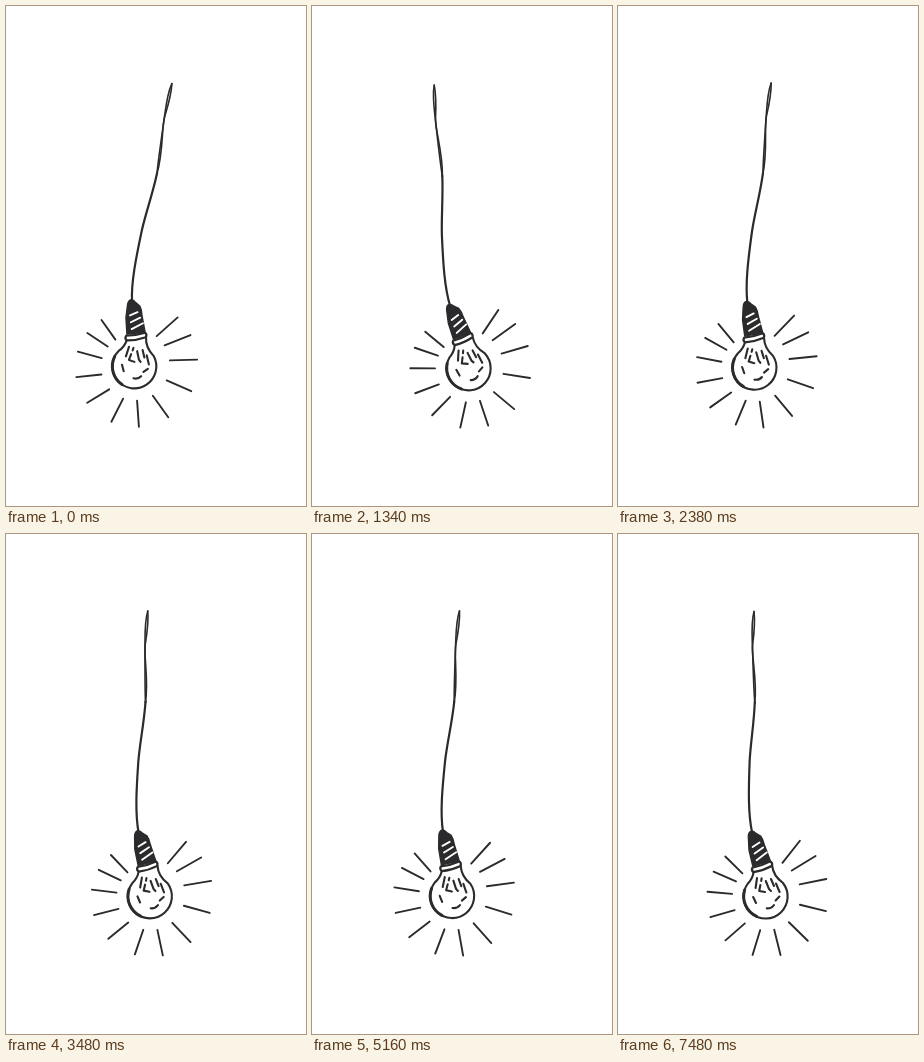
Write an HTML page that moves like this. It is 300 px wide and 500 px high and loops after 10000 ms.

```html
<!DOCTYPE html>
<html lang="en">
<head>
<meta charset="utf-8">
<title>Swinging bulb</title>
<style>
  html, body { margin: 0; width: 100%; height: 100%; overflow: hidden; background: #fff; }
  svg { display: block; width: 100%; height: 100%; }
</style>
</head>
<body>
<svg viewBox="0 0 300 500" fill="none" stroke="#2b2b2d" stroke-width="1.9" stroke-linecap="round" stroke-linejoin="round">
  <g id="lamp">
    <!-- cord: two strands that cross, then run together -->
    <path stroke-width="1.6" d="M136 77.5C133.2 88 134 100 134.4 111S135.4 150 136.8 169"/>
    <path stroke-width="1.6" d="M136 77.5C137.4 88 136 100 134.6 111S139.4 145 136.8 169"/>
    <path stroke-width="2.2" d="M136.8 168C136 190 132.6 208 131.6 228C130.6 256 130 280 134.2 299"/>

    <!-- socket -->
    <path fill="#2b2b2d" stroke-width="1.4" d="M132.3 297.6Q135 296.4 138 299.4L142.6 302Q145 305 146.4 311L152.4 327L134.8 332L131 316L130.4 304Q130 299.5 132.3 297.6Z"/>
    <path id="stripes" stroke="#fff"/>
    <path fill="#fff" stroke-width="2.2" d="M134.4 333.6Q144 331.8 152.4 327.4Q154.8 328.6 154 331.8Q145 336.8 135.6 338.2Q133 336.6 134.4 333.6Z"/>

    <!-- glass, heavier on the left -->
    <path stroke-width="2.1" d="M135.6 338.2Q134.6 345 129.5 350A22 22 0 1 0 165 349Q155.4 342 154.2 332"/>
    <path stroke-width="3" d="M126.6 356A22 22 0 0 0 138.6 382.4"/>

    <!-- filament and glints -->
    <path stroke-width="2.1" d="M139 344L137.6 354M143.6 344.4L143.2 347M142.4 351L141.2 357L147 358M147.8 347L151 355L153 357M153 345L156 352M158 349.5L161.6 358M135.2 363L138 369M148.8 374.4Q153.6 374.6 156 371M157.6 366.4L161.4 362.6"/>
    <path id="rays"/>
  </g>
</svg>
<script>
const LOOP = 10000, STEP = 20;
// turning points of the swing: time in ms, tilt in degrees
const swing = [[0, 9.9], [260, 17], [1500, -7.8], [2590, 8.9], [4040, -2.5], [5710, 6.9], [7480, 0]];
const rayAngles = [225, 206, 184, 157, 129, 100, 75, 47, 14, -17, -41, -60];

const line = (a, b) => `M${a}L${b}`;

function polar(degrees, radius) {
  const a = degrees * Math.PI / 180;
  return [147 + radius * Math.cos(a), 362 + radius * Math.sin(a)];
}

// rays lean a little and grow towards the right
function ray(angle, i) {
  const lean = 1 + 1.7 * Math.cos(i - 4);
  return line(polar(angle - lean, 32 + .5 * i), polar(angle + lean, 56 + .85 * i));
}

const stripe = i => line([134.6 + 2 * i, 313 + 6.6 * i], [141.5 + 3.6 * i, 308.5 + 5 * i]);

function tilt(t) {
  const i = swing.findIndex(key => key[0] > t);
  if (i < 0) return swing.at(-1)[1];
  const [t0, a0] = swing[i - 1], [t1, a1] = swing[i];
  return a0 + (a1 - a0) * (t - t0) / (t1 - t0);
}

const get = id => document.getElementById(id);
get("rays").setAttribute("d", rayAngles.map(ray).join(""));
get("stripes").setAttribute("d", [0, 1, 2].map(stripe).join(""));

function draw(ms) {
  const t = Math.floor((ms % LOOP) / STEP) * STEP;
  get("lamp").setAttribute("transform", `rotate(${tilt(t)} 150 250)`);
}

const start = performance.now();
function tick() {
  draw(performance.now() - start);
  requestAnimationFrame(tick);
}
tick();
</script>
</body>
</html>
```
